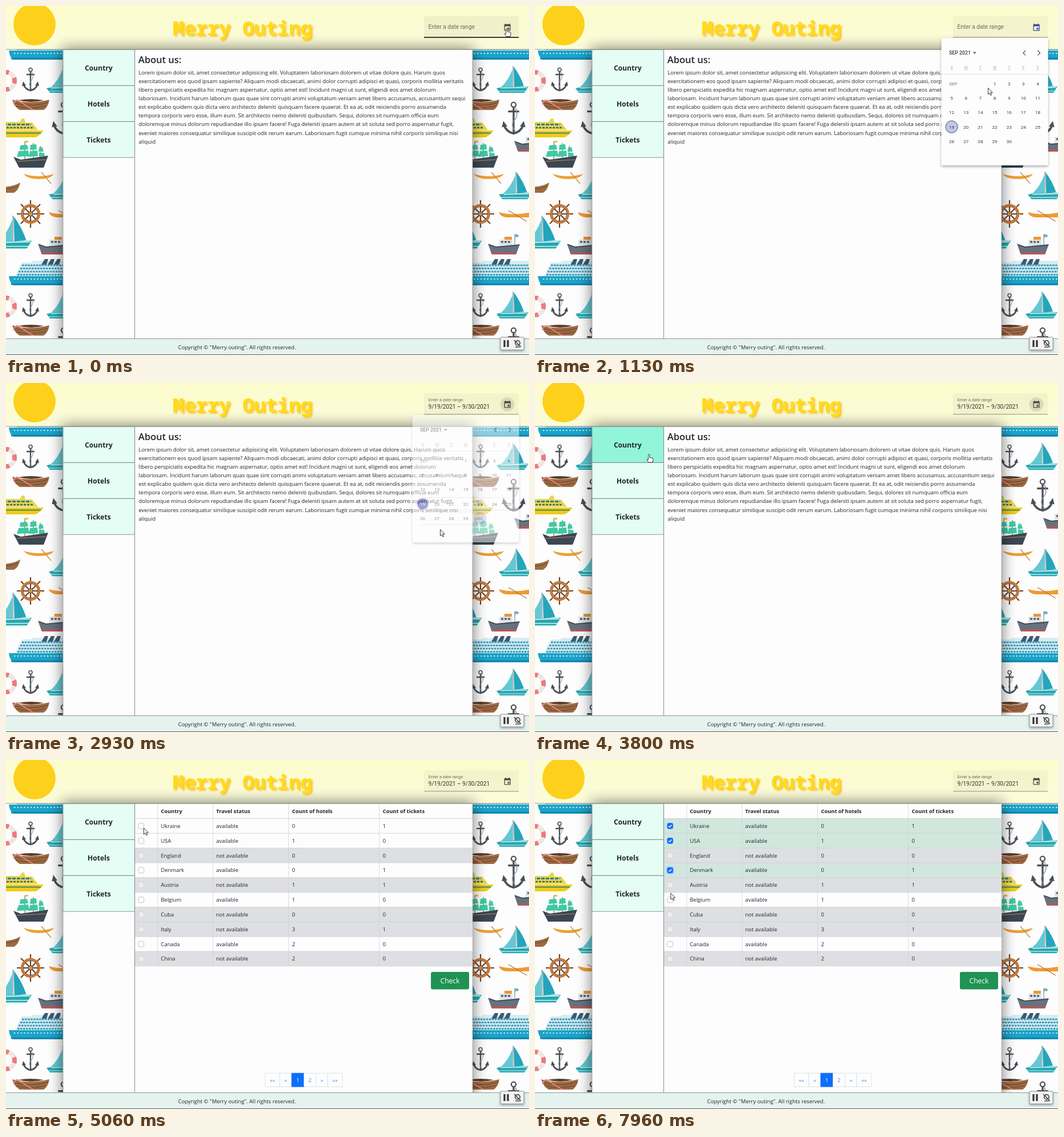
Recreate the animation shown at these times as an HTML page. Size 917 by 611 pixels, loop 8000 ms.

```html
<!DOCTYPE html>
<html lang="en">
<head>
<meta charset="utf-8">
<title>Travel page</title>
<style>
html, body { margin: 0; width: 100%; height: 100%; overflow: hidden; background: #fdfdfd; }
svg { display: block; width: 917px; height: 611px; }
text { font: 9.45px "Open Sans", sans-serif; fill: #212529; white-space: pre; }
.rob text { font: 8.1px Roboto, sans-serif; fill: #3c3c3c; }
.mid { text-anchor: middle; }
text.nav { font-size: 12.1px; font-weight: 700; }
text.bold { font-size: 9.3px; font-weight: 700; }
</style>
</head>
<body>
<svg viewBox="0 0 917 611" xmlns="http://www.w3.org/2000/svg">
<defs>
  <filter id="soft" x="-20%" y="-20%" width="140%" height="140%"><feGaussianBlur stdDeviation="12"/></filter>
  <filter id="lift" x="-20%" y="-20%" width="140%" height="140%"><feDropShadow dx="0" dy="2" stdDeviation="2" flood-opacity=".35"/></filter>
  <filter id="glow" x="-10%" y="-30%" width="120%" height="160%"><feDropShadow dx="2.5" dy="2.5" stdDeviation="1.7" flood-color="#f7bd35"/></filter>
  <linearGradient id="head" x2="0" y2="1"><stop stop-color="#fcfccd"/><stop offset="1" stop-color="#fbfbda"/></linearGradient>

  <g id="anchor" fill="none" stroke="#4a4f57" stroke-width="2.4">
    <circle cy="-17.5" r="3" stroke-width="1.6"/><path d="M0-14V19M-7-9H7" /><path d="M-12 9Q-9 17 0 19Q9 17 12 9" stroke-width="2.8"/>
    <path d="M-15 11L-13 3L-8 10ZM15 11L13 3L8 10Z" fill="#4a4f57" stroke="none"/>
    <path d="M2-14Q7-4 1 2T3 17" stroke="#8b9097" stroke-width="1"/>
  </g>
  <g id="sailboat">
    <path d="M1-36V4" stroke="#6f7f86" stroke-width="1"/>
    <path d="M2-35Q14-19 20-1L3 1Z" fill="#24a5bb"/><path d="M0-30Q-7-11-20 1L0 2Z" fill="#62c8d4"/>
    <path d="M-28 3L-18 1L28 0L21 11H-22Z" fill="#23a9b2"/><path d="M-20 2.5L26 1.5" stroke="#dff2f1" stroke-width="1.6"/>
    <path d="M-24 8H23" stroke="#d9f0ee" stroke-width="1.2"/>
  </g>
  <g id="tug">
    <path d="M20 9H43V19H20Z" fill="#dfe3e5"/><path d="M29 4H42V9H29Z" fill="#ef9436"/>
    <path d="M23 13H41" stroke="#4a5966" stroke-width="3.2" stroke-dasharray="4 2"/>
    <path d="M47 19V0L53 1V4L48 4" fill="#58c9dc" stroke="#667" stroke-width=".7"/>
    <path d="M0 16L14 21L56 17L50 33H6Z" fill="#66727d"/><path d="M5 31.5H51L49 35H7Z" fill="#b9565c"/>
    <path d="M2 18L14 22L55 19" fill="none" stroke="#3d4853" stroke-width="1.6"/>
  </g>
  <g id="tile">
    <path d="M16 474L22 460L28 449H44L48 446H140V474Z" fill="#d9ebf1"/>
    <path d="M62 453L68 443H74L71 453ZM73 453L79 443H85L82 453ZM84 453L90 443H96L93 453Z" fill="#3d5a70"/>
    <path d="M28 454H140M25 459.5H140M22 465H140M20 470.5H140" stroke="#3c9dbb" stroke-width="2.8" stroke-dasharray="3.6 1.4"/>
    <path d="M5 473H140V489H13Q6 484 5 473Z" fill="#1ba4c9"/>
    <path d="M14 478H140" stroke="#d5eff6" stroke-width="1.8" stroke-dasharray="2.2 3.6"/>
    <path d="M9 487H140" stroke="#1786ab" stroke-width="3"/>
    <circle cy="131" r="15" fill="none" stroke="#ece7e5" stroke-width="8"/>
    <circle cy="131" r="15" fill="none" stroke="#f0797a" stroke-width="8" stroke-dasharray="10.6 12.96" stroke-dashoffset="6"/>
    <use href="#anchor" x="43" y="129"/>
    <path d="M11 164Q40 173 76 164Q74 177 66 182H24Q14 176 11 164Z" fill="#9b6a42"/>
    <path d="M22 165Q42 161 66 165Q44 171 22 165Z" fill="#5f3d26"/>
    <path d="M13 169Q42 178 74 169M17 175Q42 182 70 175" fill="none" stroke="#6b4329" stroke-width="1.2"/>
    <path d="M13 172Q18 160 25 168L48 182" fill="none" stroke="#ee8480" stroke-width="2"/>
    <path d="M-5 203H24L28 197H32L34 204H46L56 217H-5Z" fill="#e9d451"/>
    <path d="M-5 207.5H44" stroke="#2f7f86" stroke-width="3" stroke-dasharray="6 2"/>
    <path d="M-5 213H49" stroke="#3c6a55" stroke-width="2.6" stroke-dasharray="4 2"/>
    <path d="M-5 218H66Q60 226 52 230H-5Z" fill="#f0cb1c"/><path d="M-5 222.5H61" stroke="#3b8f58" stroke-width="1.8"/>
    <use href="#anchor" transform="translate(101 197)scale(1.38)"/>
    <path d="M33 237V268M48 240V268M60 245V268" stroke="#6a4a38" stroke-width="1"/>
    <path d="M33 236H39V239H33Z" fill="#f0c030"/>
    <path d="M25 244L37 243L39 251L24 252ZM22 254L39 253L41 263L19 264ZM43 243L53 242L54 251L42 252ZM42 254L55 253L56 263L40 264ZM58 248L64 247L66 255L57 255ZM58 257L67 257L68 263L58 264Z" fill="#3fc9a3"/>
    <path d="M13 264L26 269L74 262L66 283H23Z" fill="#3c4753"/><path d="M19 272L70 269" stroke="#b98a5b" stroke-width="1"/>
    <use href="#tug" x="102" y="220"/>
    <path d="M31 294Q57 302 84 294Q78 303 58 303Q38 303 31 294Z" fill="#eda034"/>
    <path d="M62 291L79 311" stroke="#c98b42" stroke-width="1.4"/>
    <path d="M-5 317Q14 316 25 309Q22 323 14 327H-5Z" fill="#9b6a42"/><path d="M-5 321Q12 320 21 315" fill="none" stroke="#6b4329"/>
    <use href="#sailboat" transform="translate(104 327)scale(1.03)"/>
    <use href="#sailboat" x="99" y="141"/>
    <g fill="none" stroke="#63402b"><path d="M43 340V388M19 364H67M26 347L60 381M60 347L26 381" stroke-width="2.2"/>
      <circle cx="43" cy="364" r="15" stroke="#c97a38" stroke-width="4.4"/>
      <circle cx="43" cy="364" r="12.6" stroke-width=".8"/><circle cx="43" cy="364" r="4" fill="#d99148"/></g>
    <path d="M75 361Q102 368 132 361L128 370H88Q78 369 75 361Z" fill="#f09a32"/><path d="M92 358L124 377" stroke="#b8763a" stroke-width="1.4"/>
    <use href="#sailboat" transform="translate(11 411)scale(1.22)"/>
    <use href="#tug" x="56" y="400"/>
  </g>
</defs>

<rect width="917" height="611" fill="#fdfdfd"/>
<g id="sea"></g>
<rect width="917" height="76" fill="url(#head)"/>
<rect x="98" y="74" width="722" height="540" filter="url(#soft)" opacity=".48"/>
<path d="M0 76H917" stroke="#8d8d85"/>
<circle cx="50" cy="32" r="37" fill="#fdd01b"/>
<text x="292" y="51" style="font:700 34px 'Noto Sans Mono',monospace;fill:#ffdc12" filter="url(#glow)">Merry Outing</text>
<rect x="100" y="76.5" width="718" height="506" fill="#fdfdfd" stroke="#999" stroke-width=".8"/>
<g id="about"><text x="232" y="100" style="font-size:16.5px;font-weight:600">About us:</text></g>
<g id="table"></g>
<path d="M225.7 76V583" stroke="#888"/>
<g id="nav"></g>
<rect y="583" width="917" height="28" fill="#e5f3ef"/>
<path d="M0 582.5H917" stroke="#8f9593"/><path d="M0 610.5H917" stroke="#555"/>
<text x="405" y="600.5" class="mid">Copyright © "Merry outing". All rights reserved.</text>

<g class="rob">
  <path id="fieldBox" d="M733 55V21Q733 18 736 18H896Q899 18 899 21V55Z"/>
  <path id="fieldLine" d="M733 54.8H899"/>
  <text id="label" x="740.5" style="fill:#6c6c60"></text>
  <text id="value" x="740.5" y="45.3" style="font-size:10.08px;fill:#333"></text>
  <circle id="ripple" cx="879" cy="37.5" r="12.5"/>
  <g id="icon"><path fill-rule="evenodd" d="M873.5 33Q873.5 32 874.5 32H883.8Q884.8 32 884.8 33V42.5Q884.8 43.6 883.8 43.6H874.5Q873.5 43.6 873.5 42.5ZM874.8 35.5V42.3H883.5V35.5ZM875.3 30.8H876.7V32H875.3ZM881.6 30.8H883V32H881.6ZM879.5 38H882.5V41.2H879.5Z"/></g>
</g>

<g id="calendar" class="rob">
  <rect x="712.6" y="56" width="187" height="223" rx="2.5" fill="#fdfdfd" filter="url(#lift)"/>
  <text x="726" y="85" style="font-size:8.8px;font-weight:500">SEP 2021</text>
  <path d="M767.5 80.5H774L770.8 84Z" fill="#666"/>
  <path d="M860 78L856 82.2L860 86.4M881.5 78L885.5 82.2L881.5 86.4" fill="none" stroke="#555" stroke-width="1.3"/>
  <path d="M713 119.5H899" stroke="#e2e2e2"/>
  <text x="726" y="138.6" style="fill:#777">SEP</text>
  <path id="range" fill="none" stroke="#b5b5b5" stroke-width=".8" stroke-dasharray="2 1.5"/>
  <circle id="hover" r="11" fill="#c3c7e6"/>
  <g id="today"><circle r="11"/><circle r="10" fill="none" stroke-width="1"/></g>
  <g id="days" class="mid"></g>
</g>

<g filter="url(#lift)"><rect x="867" y="580" width="41" height="22" rx="1" fill="#f4f4f4" stroke="#777" stroke-width=".8"/></g>
<path d="M874 585V597M880 585V597" stroke="#333" stroke-width="3.2"/>
<g fill="none" stroke="#444" stroke-width="1.7"><circle cx="897" cy="590" r="4.2"/><path d="M891 585L903 597M893 597H901"/></g>

<path id="arrow" d="M0 0V11.2L2.6 8.8L4.4 12.8L6.2 12L4.4 8.1H7.8Z" fill="#fff" stroke="#222" stroke-width=".9"/>
<path id="hand" d="M-1.2 1Q0-.8 1.2 1V6L6 7Q7.4 7.4 7.2 9L6.2 14.5H-.8L-4 9.6Q-3.6 8-1.2 9.8Z" fill="#fff" stroke="#222" stroke-width=".9"/>
</svg>

<script>
const LOOP = 8000;
const $ = id => document.getElementById(id);
const set = (id, attrs) => { for (const k in attrs) $(id).setAttribute(k, attrs[k]); };
const show = (id, on) => { $(id).style.display = on ? '' : 'none'; };
const text = (x, y, s, cls = '') => `<text x="${x}" y="${y}" class="${cls}">${s}</text>`;
const ramp = (t, a, b) => Math.min(1, Math.max(0, (t - a) / (b - a)));
const ease = p => p * p * (3 - 2 * p);

$('sea').innerHTML = [0, 789].map(x => [-395, 0, 395].map(y => `<use href="#tile" x="${x}" y="${y}"/>`).join('')).join('');

const about = [
  'Lorem ipsum dolor sit, amet consectetur adipisicing elit. Voluptatem laboriosam dolorem ut vitae dolore quis. Harum quos',
  'exercitationem eos quod ipsam sapiente? Aliquam modi obcaecati, animi dolor corrupti adipisci et quasi, corporis mollitia veritatis',
  'libero perspiciatis expedita hic magnam aspernatur, optio amet est! Incidunt magni ut sunt, eligendi eos amet dolorum',
  'laboriosam. Incidunt harum laborum quas quae sint corrupti animi voluptatum veniam amet libero accusamus, accusantium sequi',
  'est explicabo quidem quis dicta vero architecto deleniti quisquam facere quaerat. Et ea at, odit reiciendis porro assumenda',
  'tempora corporis vero esse, illum eum. Sit architecto nemo deleniti quibusdam. Sequi, dolores sit numquam officia eum',
  'doloremque minus dolorum repudiandae illo ipsam facere! Fuga deleniti ipsam autem at sit soluta sed porro aspernatur fugit,',
  'eveniet maiores consequatur similique suscipit odit rerum earum. Laboriosam fugit cumque minima nihil corporis similique nisi',
  'aliquid'];
$('about').innerHTML += about.map((s, i) => text(232.5, 119.6 + 15.13 * i, s)).join('');

$('nav').innerHTML = ['Country', 'Hotels', 'Tickets'].map((s, i) =>
  `<rect id="nav${i}" x="100" y="${76.5 + 63 * i}" width="125.5" height="62.7" fill="#e4fdf5" stroke="#8a9793"/>` +
  text(162.5, 113.3 + 63 * i, s, 'nav mid')).join('');

// Countries: name, available, hotels, tickets
const rows = [['Ukraine', 1, 0, 1], ['USA', 1, 1, 0], ['England', 0, 0, 0], ['Denmark', 1, 0, 1], ['Austria', 0, 1, 1],
  ['Belgium', 1, 1, 0], ['Cuba', 0, 0, 0], ['Italy', 0, 3, 1], ['Canada', 1, 2, 0], ['China', 0, 2, 0]];
const columns = [271.5, 368.5, 501.5, 660.5], rowHeight = 25.85;
const cells = (list, y, cls) => list.map((s, i) => text(columns[i], y, s, cls)).join('');

function tableRow([name, open, hotels, tickets], i) {
  const top = 102.4 + rowHeight * i, mid = top + 13;
  return `<rect id="row${i}" x="226" y="${top}" width="592" height="${rowHeight}" fill="${open ? '#fdfdfd' : '#dedfe2'}"/>
    <path d="M226 ${top}H818" stroke="#c9cdd0" stroke-width=".8"/>
    <rect id="ring${i}" x="229.4" y="${mid - 7.4}" width="15" height="15" rx="4.5" fill="#bcd5fb"/>
    <rect id="box${i}" x="232" y="${mid - 4.8}" width="9.8" height="9.8" rx="2.4" fill="#fdfdfd" stroke="#b3b6b9" stroke-width=".8" opacity="${open ? 1 : .45}"/>
    <path id="tick${i}" d="M234.4 ${mid + .3}l1.8 1.8l3.4-3.8" fill="none" stroke="#fff" stroke-width="1.4"/>` +
    cells([name, open ? 'available' : 'not available', hotels, tickets], mid + 3.4);
}

const edges = [454.5, 480, 501, 522.5, 543.5, 564, 590];
const pager = ['««', '«', '1', '2', '»', '»»'].map((s, i) => {
  const x = edges[i], w = edges[i + 1] - x, active = i === 2;
  return `<rect x="${x}" y="548.3" width="${w}" height="23.7" fill="${active ? '#0d6efd' : '#fdfdfd'}" stroke="${active ? '#0d6efd' : '#dee2e6'}"/>
    <text x="${x + w / 2}" y="563.8" class="mid" style="fill:${active ? '#fff' : '#4a8df0'}">${s}</text>`;
}).join('');

$('table').innerHTML = '<rect x="226" y="77" width="591.5" height="505" fill="#fdfdfd"/>' +
  cells(['Country', 'Travel status', 'Count of hotels', 'Count of tickets'], 93.4, 'bold') +
  rows.map(tableRow).join('') +
  `<path d="M226 360.9H818M266 77V361M363 77V361M495.5 77V361M654.5 77V361" stroke="#cfd3d6" stroke-width=".8"/>
   <rect x="745" y="371" width="67" height="30.5" rx="3" fill="#1f9254"/>
   <text x="778.5" y="391.2" class="mid" style="font-size:12.1px;fill:#fff">Check</text>` + pager;

const dayX = d => 730.6 + 25.15 * ((d + 2) % 7);
const dayY = d => 136 + 25.2 * Math.floor((d + 2) / 7);
$('days').innerHTML = [...'SMTWTFS'].map((s, i) =>
    `<text x="${730.6 + 25.15 * i}" y="110" style="font-size:6.9px;fill:#aaa;text-decoration:underline">${s}</text>`).join('') +
  Array.from({ length: 30 }, (_, i) => `<text id="day${i + 1}" x="${dayX(i + 1)}" y="${dayY(i + 1) + 2.9}">${i + 1}</text>`).join('');

// Pointer tip: time, x, y
const path = [[0, 878, 39], [830, 878, 40], [960, 858, 70], [1300, 731, 217], [1730, 731, 217], [2130, 798, 229], [2530, 834, 239],
  [2860, 834, 239], [3360, 316, 364], [3530, 316, 364], [3800, 200, 124.5], [4360, 200, 124.5], [4760, 249, 123], [4900, 249, 123],
  [5060, 241.6, 119], [5260, 238, 117], [5830, 238, 117], [6200, 238, 137.5], [6700, 238, 137.5], [7200, 237.5, 187],
  [7660, 237.5, 187], [7960, 238, 233], [8000, 238, 233]];
const hands = [[0, 30], [1180, 2890], [3740, 4460]];
const hoverSteps = [[1830, 20], [1980, 21], [2170, 29], [2360, 30]];
const checks = [[0, 5400, 5600, 6360], [1, 6360, 6560, 7400], [3, 7400, 7600, LOOP]]; // row, press, check, blur

function pointer(t) {
  const i = path.findIndex(k => k[0] > t), [a, x, y] = path[i - 1], [b, x2, y2] = path[i];
  const p = (t - a) / (b - a);
  return [x + (x2 - x) * p, y + (y2 - y) * p];
}

function drawField(t) {
  const fresh = t < 30, open = t >= 100 && t < 2900, float = ease(ramp(t, 1730, 1880));
  set('fieldBox', { 'fill-opacity': fresh ? .045 : .03 });
  set('fieldLine', { stroke: fresh ? '#222' : '#858578', 'stroke-width': fresh ? 1.8 : .9 });
  $('label').textContent = 'Enter a date range';
  set('label', { y: 40.4 - 8.2 * float });
  $('label').style.fontSize = 10.08 - 2.55 * float + 'px';
  $('value').textContent = t < 1730 ? '' : '9/19/2021 –' + (t < 2860 ? '' : ' 9/30/2021');
  const ripple = t < 2860 ? ramp(t, 30, 200) * (1 - ramp(t, 860, 1000)) : 1 - ramp(t, 4280, 4330);
  set('ripple', { 'fill-opacity': .1 * ripple });
  set('icon', { fill: open ? '#3f48a8' : '#4a4a45' });
}

function drawCalendar(t) {
  const grow = ease(ramp(t, 100, 230)), picked = t >= 1730;
  show('calendar', t >= 100 && t < 2980);
  set('calendar', { opacity: grow * (1 - ramp(t, 2880, 2980)), transform: `translate(0 ${56 * (1 - (.8 + .2 * grow))})scale(1 ${.8 + .2 * grow})` });
  set('today', { transform: `translate(${dayX(19)} ${dayY(19)})`, fill: picked ? '#3f48a8' : '#c3c7e6', stroke: picked ? '#fff' : '#8a8db0' });
  $('day19').style.fill = picked ? '#fff' : '';
  const step = hoverSteps.filter(s => s[0] <= t).pop(), day = step && step[1];
  show('hover', day);
  let d = '';
  if (day) {
    set('hover', { cx: dayX(day), cy: dayY(day) });
    for (const [a, b] of [[19, Math.min(day, 25)], [26, day]])
      if (b >= a) for (const s of [-11, 11]) d += `M${dayX(a)} ${dayY(a) + s}H${dayX(b)}`;
  }
  set('range', { d });
}

function drawTable(t) {
  show('table', t >= 4300);
  show('about', t < 4300);
  const glow = ramp(t, 3690, 3790) * (1 - ramp(t, 4450, 4640));
  const mix = (a, b) => Math.round(a + (b - a) * glow);
  set('nav0', { fill: `rgb(${mix(228, 146)},${mix(253, 245)},${mix(245, 217)})` });
  rows.forEach((_, i) => { show('ring' + i, false); show('tick' + i, false); });
  for (const [i, press, check, blur] of checks) {
    const on = t >= check, held = t >= press && !on;
    show('ring' + i, t >= press && t < blur);
    show('tick' + i, on);
    set('row' + i, { fill: on ? '#d1e7dd' : '#fdfdfd' });
    set('box' + i, { fill: on ? '#0d6efd' : held ? '#e4e4e6' : '#fdfdfd', stroke: on ? '#0d6efd' : held ? '#86a9de' : '#b3b6b9' });
  }
}

function draw(t) {
  drawField(t);
  drawCalendar(t);
  drawTable(t);
  const hand = hands.some(([a, b]) => t >= a && t < b);
  show('hand', hand);
  show('arrow', !hand);
  set(hand ? 'hand' : 'arrow', { transform: `translate(${pointer(t)})` });
}

let start;
function tick(now) {
  start ??= now;
  draw((now - start) % LOOP);
  requestAnimationFrame(tick);
}
draw(0);
requestAnimationFrame(tick);
</script>
</body>
</html>
```
